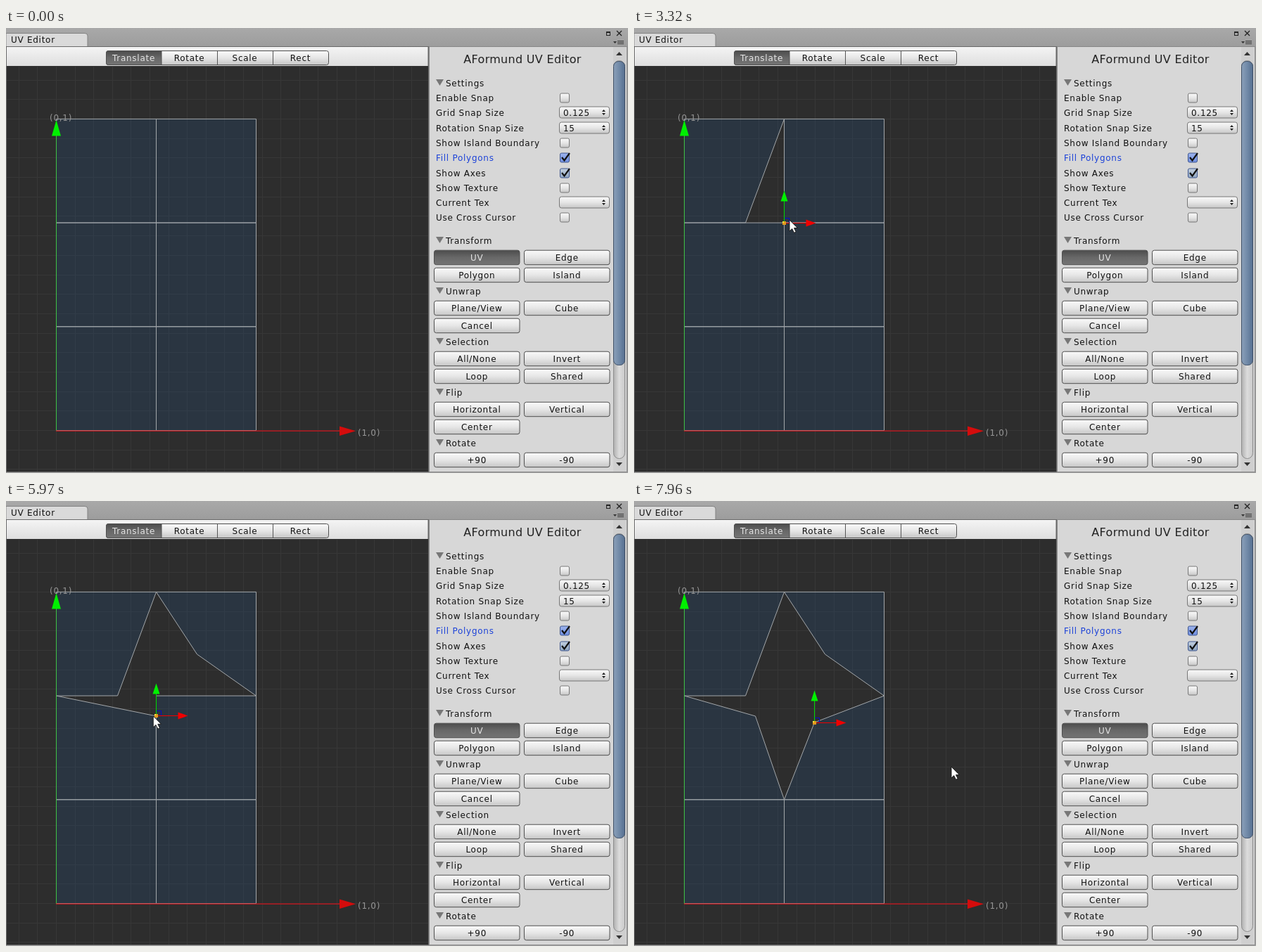
Write an HTML page that moves like this. It is 884 px wide and 633 px high and loops after 8 s.

```html
<!DOCTYPE html>
<html lang="en">
<head>
<meta charset="utf-8">
<title>UV Editor</title>
<style>
html, body { margin: 0; width: 100%; height: 100%; overflow: hidden; background: #a2a2a2; }
svg { display: block; }
text { font: 12px "DejaVu Sans", sans-serif; letter-spacing: .72px; fill: #111; white-space: pre; }
.mid { text-anchor: middle; }
.lit { fill: #e6e6e6; }
.focus { fill: #1d43d8; }
.dim { fill: #959595; }
.title { font-size: 16px; letter-spacing: .3px; fill: #222; }
</style>
</head>
<body>
<svg width="884" height="633" viewBox="0 0 884 633">
  <defs id="defs"><clipPath id="view"><path d="M1 55H600V631H1z"/></clipPath></defs>
  <g id="chrome"></g>
  <g clip-path="url(#view)">
    <g id="grid"></g>
    <g id="quads" fill="#264b70" fill-opacity=".3" stroke="#a3a7aa"></g>
    <g id="axes"></g>
    <g id="gizmo">
      <path id="square" d="M0 0V-7H7V0z" fill="none"/>
      <path d="M0 0V-32" stroke="#00d800"/>
      <path d="M-5-31H5L0-46z" fill="#00f000"/>
      <g id="arm"><path d="M0 0H32" stroke="currentColor"/><path d="M31-5V5L45 0z" fill="currentColor"/></g>
      <path d="M-2.5-2.5h5v5h-5z" fill="#e39a1c"/><path d="M-2.5-2.5h2v2h-2z" fill="#ffe640"/>
    </g>
    <path id="cursor" d="M0 0V16L3.7 12.6L6.6 18.3L9.2 17.1L6.5 11.5H11.3z" fill="#fff" stroke="#151515" stroke-width=".9"/>
  </g>
</svg>
<script>
const $ = id => document.getElementById(id);
const rect = (x, y, w, h, fill, extra = '') =>
  `<rect x="${x}" y="${y}" width="${w}" height="${h}" fill="${fill}" ${extra}/>`;
const text = (x, y, s, cls = '') => `<text x="${x}" y="${y}" class="${cls}">${s}</text>`;
const path = (d, fill, extra = '') => `<path d="${d}" fill="${fill}" ${extra}/>`;
const line = (d, color, extra = '') => path(d, 'none', `stroke="${color}" ${extra}`);

// Evenly spaced gradient stops, downwards or across.
function gradient(id, colors, across) {
  const stops = colors.map((c, i) => `<stop offset="${i / (colors.length - 1)}" stop-color="${c}"/>`);
  $('defs').innerHTML += `<linearGradient id="${id}" ${across ? '' : 'x2="0" y2="1"'}>${stops.join('')}</linearGradient>`;
}

function button(x, y, w, label, on) {
  return rect(x + .5, y - 9.8, w - 1, 20.5, on ? 'url(#down)' : 'url(#up)', 'rx="3" stroke="#4f4f4f"') +
    text(x + w / 2, y + 4.5, label, on ? 'mid lit' : 'mid');
}

function check(y, fill) {
  return rect(787.5, y - 6, 13, 13, fill || 'url(#up)', `rx="2" stroke="${fill ? '#3f568e' : '#777'}"`) +
    (fill ? line(`M790 ${y}l3.5 4.5L801 ${y - 6}`, '#111', 'stroke-width="2.2"') : '');
}

function popup(y, value) {
  return rect(786.5, y - 8, 71, 16, 'url(#up)', 'rx="3" stroke="#777"') + text(792, y + 4.5, value) +
    path(`M847 ${y - 1}h5l-2.5-3zM847 ${y + 1}h5l-2.5 3z`, '#222');
}

const header = (y, label) => path(`M611 ${y - 5}h11l-5.5 9z`, '#777') + text(625, y + 4.5, label);

function drawWindow() {
  let s = rect(0, 0, 884, 633, '#a2a2a2') + rect(0, 0, 884, 27, 'url(#bar)');
  s += path('M0 26.5V7.5H112Q116 7.5 116 11V26.5', '#dadada', 'stroke="#828282"') + text(7, 21, 'UV Editor');
  s += rect(853.5, 5.5, 5, 5, 'none', 'stroke="#222"') + rect(853, 5, 6, 2, '#222');
  s += line('M868 4l7 7m0-7l-7 7', '#222', 'stroke-width="1.3"');
  s += path('M863 19h5l-2.5 3z', '#333') + line('M869 18.5h9m-9 2h9m-9 2h9', '#444');
  s += rect(0, 26, 601, 606, '#6a6a6a') + rect(1, 27, 598.5, 27, 'url(#tool)') + rect(1, 54, 599, 577, '#2d2d2d');
  s += rect(142.5, 32.5, 316, 20, 'url(#up)', 'rx="3" stroke="#4f4f4f"');
  s += path('M221 32.5H145.5Q142.5 32.5 142.5 35.5V49.5Q142.5 52.5 145.5 52.5H221z', 'url(#down)', 'stroke="#4f4f4f"');
  s += line('M300.5 33V52M379.5 33V52', '#555');
  ['Translate', 'Rotate', 'Scale', 'Rect'].forEach((name, i) =>
    s += text(181.5 + i * 79, 47, name, i ? 'mid' : 'mid lit'));
  return s;
}

function drawPanel() {
  let s = rect(601, 26, 282, 606, '#888') + rect(602, 27, 280, 604, '#d7d7d7');
  s += text(734, 50, 'AFormund UV Editor', 'mid title') + header(78, 'Settings');
  const settings = [
    ['Enable Snap', check], ['Grid Snap Size', popup, '0.125'], ['Rotation Snap Size', popup, '15'],
    ['Show Island Boundary', check], ['Fill Polygons', check, 'url(#blue)'], ['Show Axes', check, 'url(#steel)'],
    ['Show Texture', check], ['Current Tex', popup, ''], ['Use Cross Cursor', check]];
  settings.forEach(([label, widget, value], i) => {
    const y = Math.round(99 + i * 21.3);
    s += text(611, y + 4.5, label, label === 'Fill Polygons' ? 'focus' : '') + widget(y, value);
  });
  const sections = [
    ['Transform', 'UV', 'Edge', 'Polygon', 'Island'],
    ['Unwrap', 'Plane/View', 'Cube', 'Cancel'],
    ['Selection', 'All/None', 'Invert', 'Loop', 'Shared'],
    ['Flip', 'Horizontal', 'Vertical', 'Center'],
    ['Rotate', '+90', '-90']];
  sections.forEach(([title, ...names], row) => {
    const y = 302 + row * 72;
    s += header(y, title);
    names.forEach((name, i) => s += button(608 + i % 2 * 128, y + 24 + (i >> 1) * 25, 122.5, name, name === 'UV'));
  });
  s += rect(863, 27, 18, 604, '#cfcfcf') + rect(863.5, 46.5, 16, 566, 'url(#track)', 'rx="8" stroke="#8c8c8c"');
  s += rect(863.5, 47.5, 16, 432, 'url(#thumb)', 'rx="7" stroke="#3e4f66"');
  return s + path('M867 39h9l-4.5-5zM867 618h9l-4.5 5z', '#333');
}

// One UV unit spans 425.6 by 443 pixels; the mesh has columns of a third.
const X = i => 71.5 + i * 142, Y = i => 129.4 + i * 147.7;
const home = [X(1), Y(1)];

function buildView() {
  let d = '';
  for (let i = -2; i < 20; i++)
    d += `M${Math.floor(71.5 + i * 26.6) + .5} 55V631M1 ${Math.floor(129.5 + i * 27.69) + .5}H600`;
  $('grid').innerHTML = line(d, '#373737');
  $('quads').innerHTML = '<polygon/>'.repeat(6);
  $('axes').innerHTML = line('M71.5 573V150', '#3fc045') + path('M65 153.5H78L71.5 131z', '#00f000') +
    line('M71 573.2H476', '#d0141c', 'stroke-width="1.3"') + path('M474 566.500V580L497 573.200z', '#d40c0c') +
    text(62, 132, '(0,1)', 'dim') + text(500, 580, '(1,0)', 'dim');
}

// Each upper quad's inner corner is hovered, picked, then dragged to its end, bending towards a bow point.
const drags = [
  { come: [50, 820], hover: [222, 278], pick: 1050, drag: [1710, 1960], end: [158.5, 277], grip: [8.5, -2] },
  { come: [2060, 2360], hover: [221, 273], pick: 3320, drag: [3800, 4040], end: [271.5, 218], grip: [8, -10] },
  { come: [4200, 4570], hover: [214, 283], pick: 5260, drag: [5300, 6170], end: [172.5, 306], grip: [-4, 0],
    bow: [282, 310], leave: [6370, 6920], away: [343, 367] },
  { come: [7070, 7420], hover: [220, 286], pick: 7420, drag: [7560, 7710], end: [256.5, 315], grip: [4, 3],
    leave: [7810, 7960], away: [451, 378] }];

const progress = (t, [t0, t1]) => Math.min(1, Math.max(0, (t - t0) / (t1 - t0)));
const mix = (a, b, f) => a.map((v, i) => v + (b[i] - v) * f);
const add = (a, b) => a.map((v, i) => v + b[i]);

function glide(from, to, t, span) {
  const p = progress(t, span);
  return mix(from, to, p * p * (3 - 2 * p));
}

function cornerAt({ drag, end, bow = mix(home, end, .5) }, t) {
  const p = progress(t, drag);
  return mix(mix(home, bow, p), mix(bow, end, p), p);
}

function cursorAt(t) {
  let pos = [330, 640];
  for (const d of drags) {
    const start = d.drag[0];
    pos = glide(pos, d.hover, t, d.come);
    pos = glide(pos, add(home, d.grip), t, [start - 50, start]);
    if (t > start) pos = add(cornerAt(d, t), d.grip);
    if (d.away) pos = glide(pos, d.away, t, d.leave);
  }
  return pos;
}

const place = (id, [x, y]) => $(id).setAttribute('transform', `translate(${x} ${y})`);
const snap = v => Math.floor(v) + .5;

function draw(now) {
  const t = now % 8000;
  const corners = drags.map(d => cornerAt(d, t));
  [...$('quads').children].forEach((quad, i) => {
    const c = i % 2, r = i >> 1;
    const points = [[c, r], [c + 1, r], [c + 1, r + 1], [c, r + 1]].map(([u, v]) =>
      u === 1 && v === 1 && corners[i] || [X(u), Y(v)]);
    quad.setAttribute('points', points.join(' '));
  });

  const active = drags.filter(d => d.pick <= t).length - 1;
  $('gizmo').style.visibility = active < 0 ? 'hidden' : 'visible';
  if (active >= 0) place('gizmo', corners[active].map(snap));
  $('arm').style.color = t > 1250 && t < 2110 ? '#ffe600' : '#f00000';
  $('square').setAttribute('stroke', t > 3640 && t < 4270 ? '#f5df00' : '#0808c8');
  place('cursor', cursorAt(t));
  requestAnimationFrame(draw);
}

gradient('bar', ['#a9a9a9', '#9c9c9c']);
gradient('tool', ['#f4f4f4', '#dedede']);
gradient('up', ['#fafafa', '#e6e6e6', '#c6c6c6']);
gradient('down', ['#4c4c4c', '#686868', '#747474']);
gradient('blue', ['#9db4ee', '#6f8ee0']);
gradient('steel', ['#c3d0e0', '#8fa5c0']);
gradient('track', ['#b0b0b0', '#dcdcdc', '#cacaca'], true);
gradient('thumb', ['#8ba0b9', '#718aa8', '#566f8f'], true);
$('chrome').innerHTML = drawWindow() + drawPanel();
buildView();
requestAnimationFrame(draw);
</script>
</body>
</html>
```
